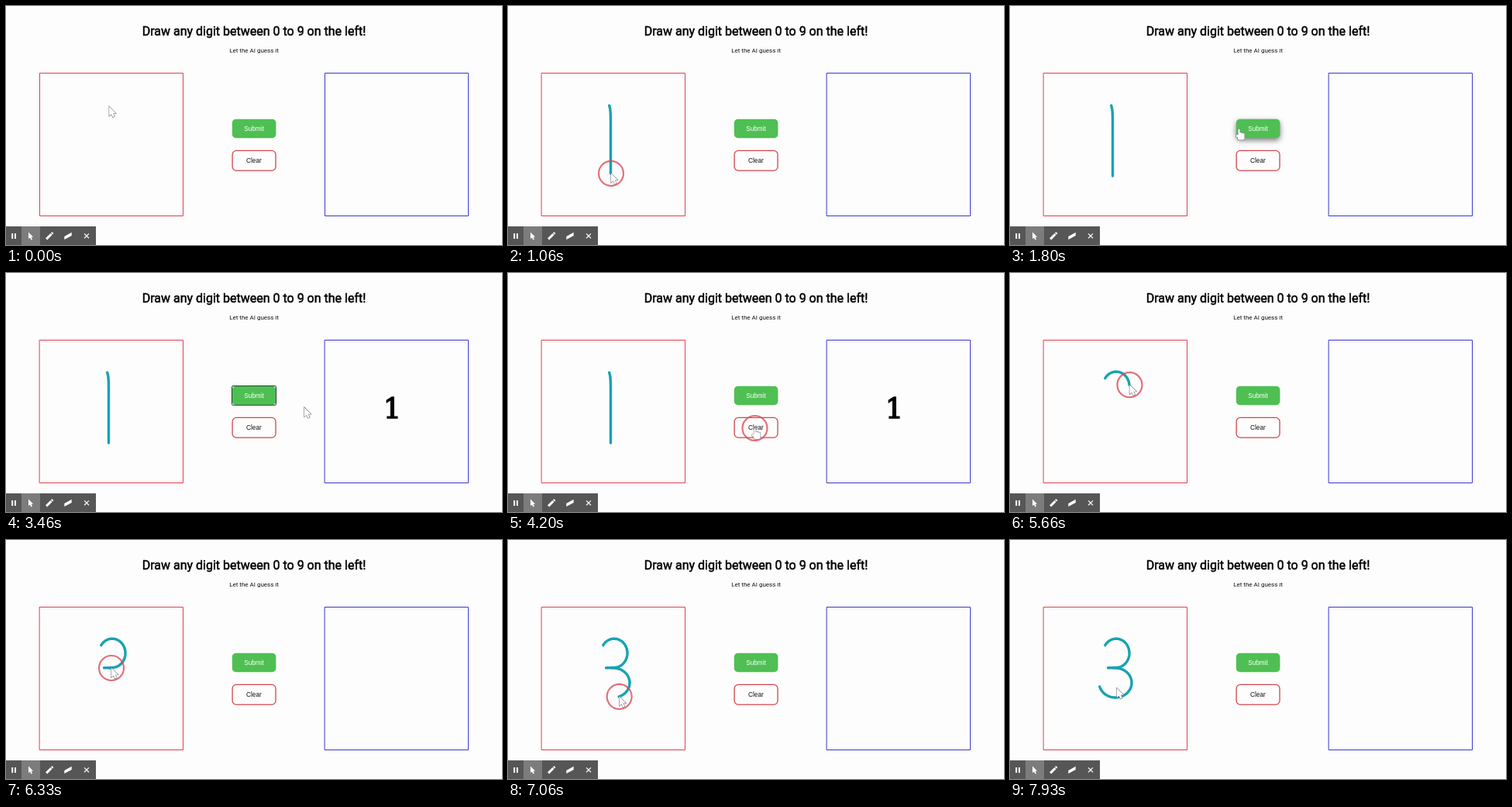
An HTML page with a canvas that plays this animation: 640x308 px, repeating every 8 s.

```html
<!DOCTYPE html>
<html lang="en">
<head>
<meta charset="utf-8">
<title>Digit guesser</title>
<style>
html, body { margin: 0; width: 100%; height: 100%; overflow: hidden; background: #fdfdfd; }
canvas { display: block; width: 640px; height: 308px; }
</style>
</head>
<body>
<canvas id="stage"></canvas>
<script>
const W = 640, H = 308, LOOP = 8000, STEP = 1000 / 15;
const canvas = document.getElementById('stage');
const dpr = window.devicePixelRatio || 1;
canvas.width = W * dpr;
canvas.height = H * dpr;
const ctx = canvas.getContext('2d');
ctx.scale(dpr, dpr);

const TEAL = '#17a2b3', GREEN = '#4fbf53', RED = '#de4055', BLUE = '#3838d0';
const BUTTON_FONT = '8.2px "Liberation Sans", sans-serif';

const clamp = v => Math.max(0, Math.min(1, v));
const mix = (a, b, u) => a + (b - a) * u;
const ease = u => u * u * (3 - 2 * u);
const within = (t, a, b) => t >= a && t < b;

// Sample a curve at about one point per pixel, so drawing speed stays even.
const sample = (n, fn) => Array.from({ length: n + 1 }, (_, i) => fn(i / n));
const line = (x0, y0, x1, y1) =>
  sample(Math.round(Math.hypot(x1 - x0, y1 - y0)), u => [mix(x0, x1, u), mix(y0, y1, u)]);
const bowl = (cx, cy, rx, ry, from, to) =>
  sample(Math.round((to - from) * Math.PI / 180 * (rx + ry) / 2), u => {
    const a = mix(from, to, u) * Math.PI / 180;
    return [cx + rx * Math.cos(a), cy + ry * Math.sin(a)];
  });

const one = sample(91, u => [132.5 - 1.9 * Math.exp(-u * 18), 128.3 + 90.7 * u]);
const three = [
  ...bowl(137, 145.8, 17, 18.6, -147, 90),
  ...line(137, 164.4, 126.5, 164.8),
  ...line(126.5, 164.8, 136, 165),
  ...bowl(136, 184, 21, 19, -90, 165)
];

const move = (start, end, x, y) => ({ start, end, x, y });
const stroke = (start, end, pts, wipe) => ({ start, end, pts, wipe });

// Everything the pointer does, in order; it rests between entries.
const actions = [
  move(0, 250, 131, 128.3),
  stroke(270, 1096, one, 4330),
  move(1200, 1800, 295, 158.5),
  move(1800, 2130, 312, 160.5),
  move(3130, 3460, 384.5, 173.4),
  move(3660, 4130, 318, 200),
  move(4400, 5060, 124, 137),
  stroke(5100, 7490, three, LOOP),
  move(7800, LOOP, 145, 191.7)
];
const presses = [[260, 1190], [2200, 2400], [4200, 4330], [5000, 7660]];

function tipOf({ start, end, pts }, t) {
  const p = clamp((t - start) / (end - start)) * (pts.length - 1);
  const i = Math.floor(p), a = pts[i], b = pts[i + 1] || a;
  return { i, x: mix(a[0], b[0], p - i), y: mix(a[1], b[1], p - i) };
}

function pointerAt(t) {
  let pos = { x: 132.7, y: 129.7 };
  for (const a of actions) {
    if (t < a.start) break;
    const u = ease(clamp((t - a.start) / (a.end - a.start)));
    pos = a.pts ? tipOf(a, t) : { x: mix(pos.x, a.x, u), y: mix(pos.y, a.y, u) };
  }
  return pos;
}

function text(str, x, y, font, color, embolden) {
  ctx.font = font;
  ctx.textAlign = 'center';
  ctx.fillStyle = ctx.strokeStyle = color;
  ctx.fillText(str, x, y);
  if (embolden) {
    ctx.lineJoin = 'miter';
    ctx.lineWidth = embolden;
    ctx.strokeText(str, x, y);
  }
}

function frame(x, y, w, h, color, lw, r = 0) {
  ctx.beginPath();
  ctx.roundRect(x, y, w, h, r);
  ctx.strokeStyle = color;
  ctx.lineWidth = lw;
  ctx.stroke();
}

// Run a drawing step in its own coordinates.
function at(x, y, draw) {
  ctx.save();
  ctx.translate(x, y);
  draw();
  ctx.restore();
}

function drawStroke(s, t) {
  if (!within(t, s.start, s.wipe)) return;
  const tip = tipOf(s, t);
  ctx.beginPath();
  s.pts.slice(0, tip.i + 1).forEach(([x, y]) => ctx.lineTo(x, y));
  ctx.lineTo(tip.x, tip.y);
  ctx.strokeStyle = TEAL;
  ctx.lineWidth = 3.4;
  ctx.lineCap = ctx.lineJoin = 'round';
  ctx.stroke();
}

function drawSubmit(hover, focus) {
  ctx.save();
  if (hover) {
    ctx.shadowColor = 'rgba(0,0,0,.5)';
    ctx.shadowBlur = 7 * dpr;
    ctx.shadowOffsetY = 3 * dpr;
  }
  ctx.beginPath();
  ctx.roundRect(291.8, 145.8, 56.6, 24.4, 5);
  ctx.fillStyle = GREEN;
  ctx.fill();
  ctx.restore();
  if (focus) frame(291.5, 145.5, 57, 24.8, '#24402a', 1, 1.5);
  text('Submit', 320, 160.6, BUTTON_FONT, '#fff');
}

function drawClear() {
  frame(292.1, 186.4, 55.9, 25.7, '#d0464e', 1.3, 5);
  text('Clear', 319.9, 202, BUTTON_FONT, '#111');
}

const arrow = new Path2D('M0 0V11.8L2.7 9.5L4.7 13.6L6.8 12.6L4.9 8.7L8.4 8.4Z');

// A raised finger, three shorter ones, a thumb and the palm.
const hand = new Path2D();
for (let i = 0; i < 4; i++) hand.roundRect(-1 + 2 * i, i ? 4 + 0.5 * i : 0, 2, 8, 1);
hand.roundRect(-3.6, 7.6, 3.6, 3, 1.4);
hand.roundRect(-1.6, 7, 8.6, 7, 2);

function drawToolbar() {
  ctx.fillStyle = '#565656';
  ctx.fillRect(0, 284, 116, 24);
  ctx.fillStyle = '#7c7c7c';
  ctx.fillRect(20, 284, 24, 24);
  ctx.fillStyle = ctx.strokeStyle = '#fff';
  ctx.fillRect(7.2, 293, 2, 7);
  ctx.fillRect(11, 293, 2, 7);
  at(29, 291.5, () => {
    ctx.scale(0.73, 0.73);
    ctx.fill(arrow);
  });
  at(56, 296.5, () => {
    ctx.rotate(-Math.PI / 4);
    ctx.fillRect(-5.5, -1.5, 9, 3);
    ctx.fillRect(4.3, -1.5, 1.9, 3);
  });
  at(80, 296.4, () => {
    ctx.transform(1, -0.55, 0, 1, 0, 0);
    ctx.fillRect(-4.7, -2.1, 9.4, 4.2);
  });
  at(104, 296.3, () => {
    ctx.rotate(Math.PI / 4);
    ctx.fillRect(-4.2, -0.6, 8.4, 1.2);
    ctx.fillRect(-0.6, -4.2, 1.2, 8.4);
  });
}

function drawPointer(t, pos, overButton) {
  at(pos.x + 0.5, pos.y, () => {
    if (presses.some(([a, b]) => within(t, a, b))) {
      ctx.beginPath();
      ctx.arc(0, 0, 16, 0, Math.PI * 2);
      ctx.strokeStyle = 'rgba(222,72,88,.78)';
      ctx.lineWidth = 2.2;
      ctx.stroke();
    }
    const shape = overButton ? hand : arrow;
    ctx.lineJoin = 'miter';
    ctx.lineWidth = 1.3;
    ctx.strokeStyle = '#808088';
    ctx.stroke(shape);
    ctx.fillStyle = '#fff';
    ctx.fill(shape);
  });
}

function render(t) {
  const pos = pointerAt(t);
  const over = top => within(pos.x, 291, 349) && within(pos.y, top, top + 25);
  const onSubmit = over(146), onClear = over(187);

  ctx.fillStyle = '#fdfdfd';
  ctx.fillRect(0, 0, W, H);
  text('Draw any digit between 0 to 9 on the left!', 320, 38.4, '16px Roboto, sans-serif', '#000', 0.5);
  text('Let the AI guess it', 320, 60.4, '8px Roboto, sans-serif', '#111');
  frame(43.5, 86.5, 185, 184, RED, 1);
  frame(411.5, 86.5, 185, 184, BLUE, 1);
  drawSubmit(onSubmit, within(t, 2200, 4200));
  drawClear();
  actions.filter(a => a.pts).forEach(s => drawStroke(s, t));
  if (within(t, 2660, 4330)) text('1', 498.4, 187, '36px "DejaVu Serif", serif', '#000', 1.5);
  drawToolbar();
  drawPointer(t, pos, onSubmit || onClear);
}

// The picture advances 15 times per second.
const begin = performance.now();
function tick() {
  const t = (performance.now() - begin) % LOOP;
  render(Math.floor((t + 9) / STEP) * STEP % LOOP);
  requestAnimationFrame(tick);
}
tick();
</script>
</body>
</html>
```
